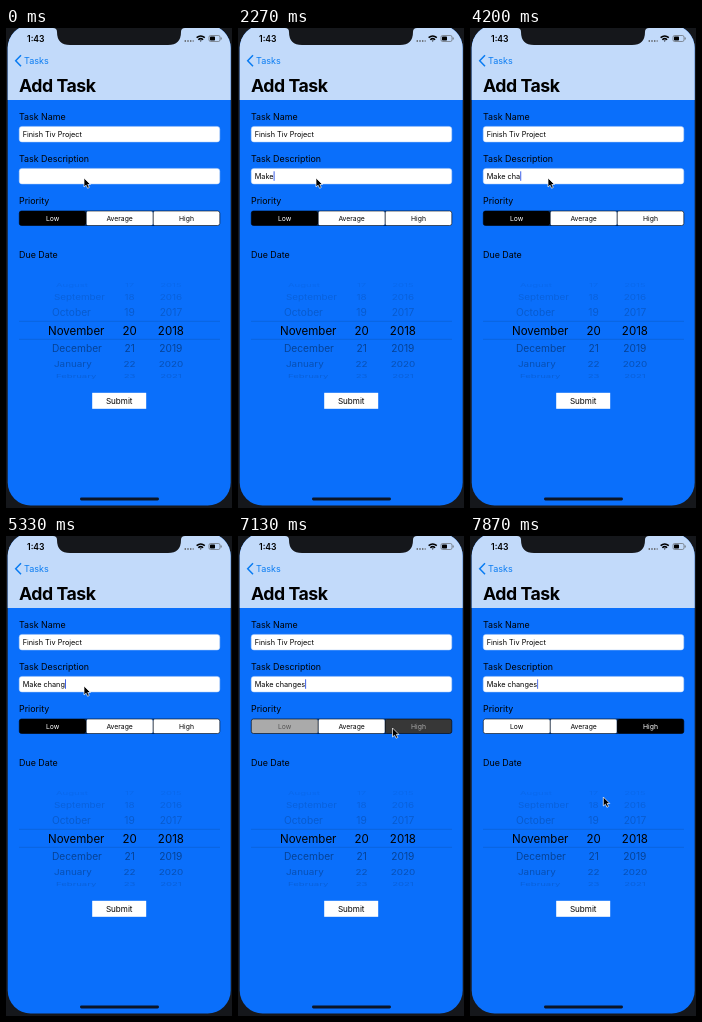
Recreate the animation shown at these times as an HTML page. Size 226x480 px, loop 8 s.

```html
<!DOCTYPE html>
<html lang="en">
<head>
<meta charset="utf-8">
<title>Add Task</title>
<style>
  html, body { margin: 0; width: 100%; height: 100%; overflow: hidden; background: #15171b; }
  svg { display: block; width: 100%; height: 100%; font-family: Inter, sans-serif; }
  .label { font-size: 8.9px; }
  .field { font-size: 7.3px; }
  .segment { font-size: 6.8px; text-anchor: middle; }
</style>
</head>
<body>
<svg viewBox="0 0 226 480">
  <defs><clipPath id="screen"><rect x="1.7" y="-3" width="223" height="480.5" rx="23"/></clipPath></defs>
  <g clip-path="url(#screen)">
    <rect width="226" height="480" fill="#0a6ffb"/>
    <rect width="226" height="72" fill="#c2dafa"/>
    <path d="M47 0Q51 0 51 4Q51 17 64 17H162Q175 17 175 4Q175 0 179 0Z" fill="#15171b"/>
    <rect x="74" y="469.6" width="79" height="2.8" rx="1.4" fill="#0b1526"/>
  </g>

  <text x="21" y="13.6" font-size="8.6" font-weight="600">1:43</text>
  <path d="M178.6 13h9" stroke="#555" stroke-width="1.4" stroke-dasharray="1.4 1.3"/>
  <g fill="none" stroke="#000" stroke-width="1.5">
    <path d="M190.6 9.7Q194.7 6.3 198.8 9.7M192.3 11.7Q194.7 9.6 197.1 11.7"/>
    <path d="M193.6 12.5h2.2l-1.1 1.2Z" fill="#000" stroke="none"/>
    <rect x="203" y="7.5" width="11" height="6" rx="1.6" stroke="#555" stroke-width=".6"/>
    <rect x="204" y="8.5" width="5" height="4" rx=".7" fill="#000" stroke="none"/>
    <path d="M215.2 9.5v2" stroke="#555" stroke-width=".8"/>
  </g>
  <path d="M15 27.3L9.7 32.8L15 38.3" fill="none" stroke="#087bf2" stroke-width="1.5"/>
  <text x="18" y="36" font-size="9" fill="#087bf2">Tasks</text>
  <text x="13" y="64.3" font-size="17.7" font-weight="700" letter-spacing="-.45">Add Task</text>

  <text class="label" x="13" y="91.5">Task Name</text>
  <text class="label" x="13" y="133.5">Task Description</text>
  <text class="label" x="13" y="175.5">Priority</text>
  <text class="label" x="13" y="230">Due Date</text>
  <g fill="#fff" stroke="#a9c8f4" stroke-width=".5">
    <rect x="13.2" y="98.4" width="200.6" height="15.6" rx="2.8"/>
    <rect x="13.2" y="140.4" width="200.6" height="15.6" rx="2.8"/>
  </g>
  <text class="field" x="16.7" y="108.7">Finish Tiv Project</text>
  <text class="field" id="typed" x="16.7" y="150.7" xml:space="preserve"></text>
  <rect id="caret" y="143.3" width="1" height="9.5" fill="#3f62e8"/>
  <g id="bubble">
    <rect x="35" y="156.5" width="31" height="14" rx="2" fill="#fff"/>
    <text x="37" y="166" font-size="6" fill="#0a6ffb">change</text>
    <path d="M61.5 162l3 3m0-3l-3 3" stroke="#888" stroke-width=".7"/>
  </g>

  <g id="segments"></g>
  <rect x="13.3" y="183" width="200.5" height="14.5" rx="2.2" fill="none" stroke="#000" stroke-width=".6"/>
  <path d="M80.2 183v14.5M147.2 183v14.5" stroke="#000" stroke-width=".7"/>

  <g id="wheel"></g>
  <path d="M13 293.3H214M13 311.3H214" stroke="#0b5ccb" stroke-width=".6"/>
  <rect x="86.2" y="364.8" width="54" height="16" fill="#fff"/>
  <text x="113.2" y="376" font-size="8.1" text-anchor="middle">Submit</text>
  <path id="pointer" d="M0 0V9L2.1 7.2L3.6 10.3L5.3 9.4L3.8 6.5H6.5Z" fill="#000" stroke="#fff" stroke-width=".7"/>
</svg>
<script>
const LOOP = 8000, TICK = 200 / 3;
const byId = id => document.getElementById(id);
const ramp = (t, from, to) => Math.min(1, Math.max(0, (t - from) / (to - from)));

function add(parent, tag, attrs, text = '') {
  const node = document.createElementNS('http://www.w3.org/2000/svg', tag);
  for (const key in attrs) node.setAttribute(key, attrs[key]);
  node.textContent = text;
  return byId(parent).appendChild(node);
}

// The date wheel is a cylinder seen from the front.
const RADIUS = 54.3, ROW_ANGLE = .33;
const months = ['August', 'September', 'October', 'November', 'December', 'January', 'February'];
months.forEach((month, i) => {
  const row = i - 3, distance = Math.abs(row), angle = row * ROW_ANGLE;
  const size = row ? 10.5 : 11.5, depth = 1 - .03 * distance;
  const y = 302.5 + RADIUS * Math.sin(angle);
  const opacity = row ? (row < 0 ? .2 : .45) * Math.cos(angle) ** 2 : 1;
  const cell = (x, anchor, text) => add('wheel', 'text', {
    transform: `translate(${x} ${y}) scale(${depth} ${depth * Math.cos(angle)})`,
    y: size * .36, 'font-size': size, 'text-anchor': anchor, opacity
  }, text);
  cell(row ? 44 + 2 * distance : 42, 'start', month);
  cell(123.6, 'middle', 20 + row);
  cell(164.9, 'middle', 2018 + row);
});

const [low, average, high] = ['Low', 'Average', 'High'].map((name, i) => ({
  box: add('segments', 'rect', { x: 13.3 + i * 66.9, y: 183, width: 66.7, height: 14.5, rx: 2 }),
  text: add('segments', 'text', { class: 'segment', x: 46.7 + i * 66.9, y: 192.8 }, name)
}));

function paint({ box, text }, fill, ink) {
  const gray = v => `rgb(${v * 255},${v * 255},${v * 255})`;
  box.setAttribute('fill', gray(fill));
  text.setAttribute('fill', gray(ink));
}

// One character per tick: "." waits, "_" is a space, "<" deletes.
const FOCUS = 3, FIRST_KEY = 26;
const keys = 'M.a...k.e...._....c.h..a..gn..e...<<.<..........n.....g.e...s';

function typeUntil(tick) {
  let text = '', lastKey = FOCUS;
  [...keys.slice(0, Math.max(0, tick - FIRST_KEY + 1))].forEach((key, i) => {
    if (key === '.') return;
    text = key === '<' ? text.slice(0, -1) : text + key.replace('_', ' ');
    lastKey = FIRST_KEY + i;
  });
  return { text, lastKey };
}

// The caret stays solid after a key, then fades out and snaps back.
function blink(age) {
  const phase = age % 1070;
  return age < 0 ? 0 : 1 - ramp(phase, 420, 720) + ramp(phase, 1010, 1070);
}

const moves = [
  { from: 6000, to: 6330, dx: 65, dy: 40 },
  { from: 6400, to: 6870, dx: 11.5, dy: 2 },
  { from: 7330, to: 7800, dx: -21.2, dy: 69 }
];

function pointerAt(t) {
  return moves.reduce(([x, y], { from, to, dx, dy }) => {
    const p = ramp(t, from, to);
    return [x + dx * p, y + dy * p];
  }, [78, 150]);
}

function draw(time) {
  const tick = Math.floor((time % LOOP + 5) / TICK), t = tick * TICK;
  const { text, lastKey } = typeUntil(tick);
  const typed = byId('typed'), caret = byId('caret');
  typed.textContent = text;
  caret.setAttribute('x', 16.8 + typed.getComputedTextLength());
  caret.setAttribute('opacity', blink((tick - lastKey) * TICK));
  byId('bubble').setAttribute('visibility', text.endsWith('gne') ? 'visible' : 'hidden');

  const press = ramp(t, 7000, 7200);
  paint(low, press, 1 - press);
  paint(average, 1, 0);
  paint(high, (1 - press) ** 1.4, press);
  byId('pointer').setAttribute('transform', `translate(${pointerAt(t)})`);
}

const start = performance.now();
function frame() {
  draw(performance.now() - start);
  requestAnimationFrame(frame);
}
draw(0);
requestAnimationFrame(frame);
</script>
</body>
</html>
```
